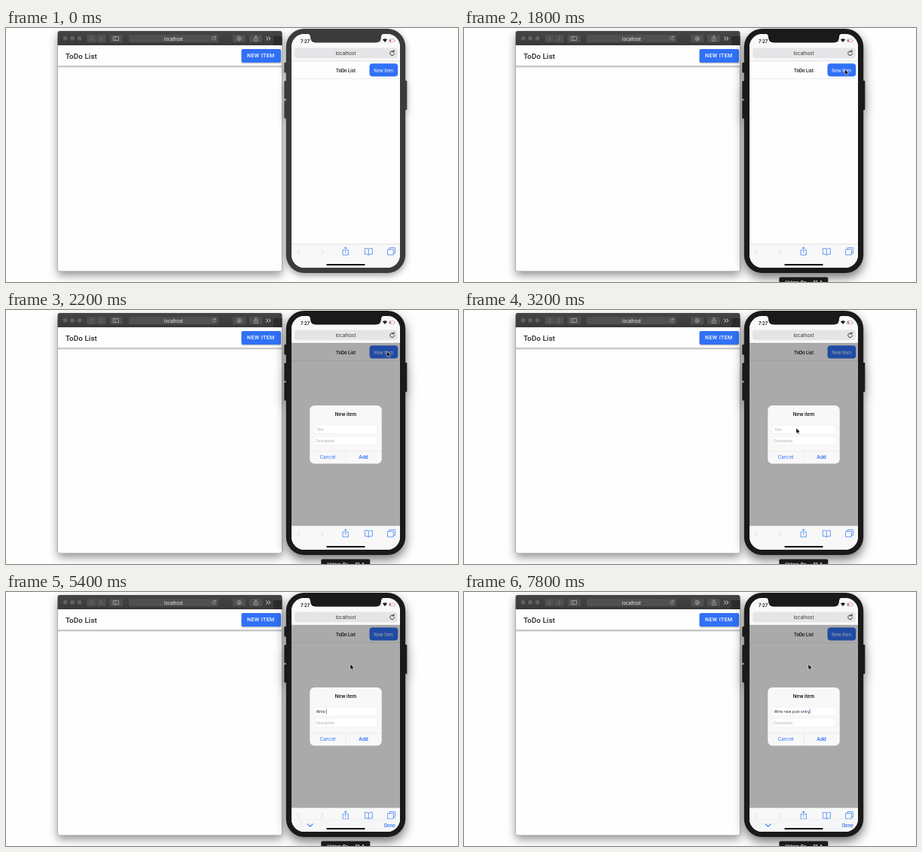
An HTML page for the animation above (8 s loop, 600 by 338 pixels).

```html
<!DOCTYPE html>
<html lang="en">
<head>
<meta charset="utf-8">
<title>ToDo List</title>
<style>
html, body { margin: 0; width: 100%; height: 100%; overflow: hidden; background: #fefefe; }
svg { display: block; width: 600px; height: 338px; }
text { font-family: Inter, "Liberation Sans", sans-serif; dominant-baseline: central; white-space: pre; }
.mid { text-anchor: middle; }
.bold { font-weight: 600; }
.roboto { font-family: Roboto, sans-serif; font-weight: 500; }
.line { fill: none; stroke-linecap: round; stroke-linejoin: round; }
#window { filter: drop-shadow(0 5px 6px rgba(0,0,0,.42)); }
#shell { fill: #3b3b3b; filter: drop-shadow(0 3px 4px rgba(0,0,0,.38)); }
.active #shell { fill: #1a1a1a; filter: drop-shadow(0 6px 7px rgba(0,0,0,.55)); }
#label { display: none; }
.active #label { display: inline; }
</style>
</head>
<body>
<svg id="stage" viewBox="0 0 600 338">
  <defs>
    <clipPath id="screen"><rect x="379" y="8" width="144" height="311" rx="17"/></clipPath>
    <linearGradient id="bar" x2="0" y2="1"><stop stop-color="#454545"/><stop offset="1" stop-color="#393939"/></linearGradient>
    <linearGradient id="fade" x2="0" y2="1"><stop stop-color="#000" stop-opacity=".34"/><stop offset="1" stop-color="#000" stop-opacity="0"/></linearGradient>
  </defs>

  <!-- desktop browser -->
  <g id="window">
    <rect x="68.6" y="4" width="297.8" height="320" rx="3" fill="#8b8b8b"/>
    <path d="M69 23H366V321.5a2 2 0 0 1-2 2H71a2 2 0 0 1-2-2Z" fill="#fefefe"/>
  </g>
  <path d="M68.6 23V7a3 3 0 0 1 3-3H363.4a3 3 0 0 1 3 3V23Z" fill="url(#bar)"/>
  <rect x="355" y="11" width="11.4" height="12" fill="#2c2c2c"/>
  <g fill="#606060"><circle cx="78.6" cy="13.7" r="2.9"/><circle cx="88" cy="13.7" r="2.9"/><circle cx="97.4" cy="13.7" r="2.9"/></g>
  <g fill="#505050">
    <rect x="107.5" y="9" width="12" height="10" rx="1.5"/><rect x="120.5" y="9" width="12" height="10" rx="1.5"/>
    <rect x="137.5" y="9" width="17.5" height="10" rx="1.5"/><rect x="163" y="9" width="119" height="10" rx="1.5"/>
    <rect x="301" y="9" width="17" height="10" rx="1.5"/><rect x="323" y="9" width="17" height="10" rx="1.5"/>
  </g>
  <g class="line" stroke="#7d7d7d" stroke-width=".8"><path d="M114.5 11.5l-2 2.5 2 2.5M125.5 11.5l2 2.5-2 2.5"/></g>
  <g class="line" stroke="#b4b4b4" stroke-width=".7">
    <path d="M142.5 11.5h7v5h-7zM145 11.5v5M278 12.4a2.3 2.3 0 1 0 .4 2M278.4 11v1.7h-1.7"/>
    <circle cx="309.5" cy="14" r="2.8"/><path d="M309.5 12.4v3M308.3 14.3l1.2 1.2 1.2-1.2"/>
    <path d="M330.3 13.3h-1v4h4.8v-4h-1M331.7 15.5v-5M330.3 11.7l1.4-1.4 1.4 1.4"/>
  </g>
  <path class="line" d="M345.5 11.8l2.1 2.2-2.1 2.2M348.7 11.8l2.1 2.2-2.1 2.2" stroke="#f2f2f2" stroke-width=".9"/>
  <text class="mid" x="222.5" y="14" font-size="5.8" fill="#eee">localhost</text>
  <rect x="69" y="50.3" width="297" height="3" fill="url(#fade)"/>
  <text class="roboto" x="79" y="37.3" font-size="9.8" letter-spacing=".1" fill="#222">ToDo List</text>
  <rect x="312.5" y="29.2" width="53" height="18.2" rx="2" fill="#000" opacity=".2"/>
  <rect x="312.5" y="28" width="52.5" height="18" rx="2" fill="#3171f6"/>
  <text class="roboto" x="320" y="37.2" font-size="7" letter-spacing=".45" fill="#fff">NEW ITEM</text>

  <!-- phone -->
  <g id="shell">
    <rect x="369.3" y="46" width="4" height="13.5" rx="1"/><rect x="369.3" y="70.5" width="4" height="24" rx="1"/>
    <rect x="369.3" y="96.5" width="4" height="24" rx="1"/><rect x="528.5" y="70" width="3.8" height="39" rx="1"/>
    <rect x="371.8" y="1" width="158.4" height="325" rx="24"/>
  </g>
  <g clip-path="url(#screen)">
    <rect x="379" y="8" width="144" height="311" fill="#fefefe"/>
    <rect x="379" y="8" width="144" height="36" fill="#f9f9f9"/>
    <rect x="379" y="43.6" width="144" height=".6" fill="#ccc"/>
    <rect x="383" y="26.5" width="137" height="13.8" rx="4" fill="#e5e5e7"/>
    <text class="mid" x="451" y="33.5" font-size="6.3" fill="#333">localhost</text>
    <path class="line" d="M514.7 31.5a2.9 2.9 0 1 0 .9 2.3M515 29.5v2.3h-2.3" stroke="#222" stroke-width=".9"/>
    <text class="bold" x="391" y="17" font-size="5.9" fill="#111">7:27</text>
    <g fill="#444"><circle cx="491.7" cy="17.8" r=".5"/><circle cx="493.5" cy="17.8" r=".5"/><circle cx="495.3" cy="17.8" r=".5"/><circle cx="497.1" cy="17.8" r=".5"/></g>
    <path d="M503 19l-3.1-3.4a4.4 4.4 0 0 1 6.2 0Z" fill="#222"/>
    <rect x="508.5" y="14.7" width="7" height="4" rx="1.1" fill="none" stroke="#999" stroke-width=".6"/>
    <rect x="509.2" y="15.4" width="1.8" height="2.6" rx=".5" fill="#ee4036"/><rect x="516" y="16" width=".7" height="1.5" fill="#999"/>
    <rect x="379" y="67" width="144" height=".6" fill="#e2e2e2"/>
    <text class="mid bold" x="451" y="56" font-size="5.75" fill="#111">ToDo List</text>
    <rect x="482.5" y="47.2" width="37.7" height="17.2" rx="4" fill="#3171f6"/>
    <text class="mid" x="501.2" y="56" font-size="5.75" fill="#fff">New Item</text>
    <rect id="shade" x="379" y="44" width="144" height="243"/>

    <rect x="379" y="287" width="144" height="32" fill="#f8f8f9"/>
    <rect x="379" y="287" width="144" height=".5" fill="#ccc"/>
    <path class="line" d="M389.5 294l-3 3.4 3 3.4M418.5 294l3 3.4-3 3.4" stroke="#d3d5d9" stroke-width=".9"/>
    <g class="line" stroke="#3f82f0" stroke-width=".8">
      <path d="M449 295.5h-2v6.5h7.4v-6.5h-2M450.7 298.8v-7M448.8 293.5l1.9-1.9 1.9 1.9"/>
      <path d="M481.3 294.2q-2.3-1.7-5-.8v7.7q2.7-.7 5 .9 2.3-1.6 5-.9v-7.7q-2.7-.9-5 .8v7.8"/>
      <path d="M507 294.6h7.3v7.3H507zM509 294.4v-2h7.4v7.4h-2"/>
    </g>
    <g id="assist">
      <rect x="379" y="302.5" width="144" height="17" fill="#f5f6f7"/>
      <rect x="379" y="302.5" width="144" height=".4" fill="#ddd"/>
      <path class="line" d="M387 312l3.3-3.2 3.3 3.2" stroke="#dcdee2" stroke-width=".9"/>
      <path class="line" d="M400.3 308.8l3.4 3.3 3.4-3.3" stroke="#3171f6" stroke-width="1.1"/>
      <text class="mid bold" x="509.3" y="310.5" font-size="5.8" fill="#3171f6">Done</text>
    </g>
    <rect x="425.3" y="314" width="51.4" height="1.9" rx=".95" fill="#0a0a0a"/>

    <g id="dialog">
      <rect x="403.3" y="127" width="95.4" height="77.4" rx="6" fill="#f8f8f8"/>
      <text class="mid bold" x="451" y="138.6" font-size="6.25" fill="#111">New item</text>
      <g fill="#fff" stroke="#e8e8e8" stroke-width=".5"><rect x="409" y="153.3" width="84" height="11.4" rx="2"/><rect x="409" y="168.3" width="84" height="11.4" rx="2"/></g>
      <text id="title" x="411.7" y="159" font-size="4.8"></text>
      <text x="411.3" y="174" font-size="4.8" letter-spacing="-.08" fill="#a8a8a8">Description</text>
      <path d="M403.3 187.8H498.7M451 187.8V204.4" stroke="#dedede" stroke-width=".5"/>
      <text class="mid" x="427" y="196" font-size="6.3" fill="#3171f6">Cancel</text>
      <text class="mid bold" x="474.6" y="196" font-size="6.4" fill="#3171f6">Add</text>
      <rect id="caret" y="155.6" width=".8" height="6.6" fill="#2f5fd0"/>
    </g>
  </g>
  <path id="notch" d="M400 7.5q4 .5 4 4.5 0 7.5 7.5 7.5h79q7.5 0 7.5-7.5 0-4 4-4.5Z"/>
  <g id="label">
    <rect x="418.3" y="331.6" width="65" height="12" rx="2" fill="#1a1a1a"/>
    <text class="mid bold" x="451" y="338.6" font-size="6" fill="#fff">Velora Qs — 12.4</text>
  </g>
  <path id="cursor" d="M0 0V7.2L1.7 5.7 2.8 8.2 4 7.7 2.9 5.2H5.1Z" fill="#000" stroke="#fff" stroke-width=".5"/>
</svg>
<script>
const $ = id => document.getElementById(id);
const LOOP = 8000, STEP = 200;
const PHRASE = "Write new post entry";

// [time, value...] tables
const path = [[1000, 530, 98], [1200, 513, 68], [1400, 505.6, 55], [2600, 505.6, 55],
  [2800, 497, 72], [3000, 468, 121], [3200, 441, 157], [3400, 441, 157], [3600, 449, 127], [3800, 457, 96]];
const typed = [[0, 0], [4400, 1], [4600, 2], [4800, 4], [5000, 5], [5400, 6], [5600, 7], [5800, 9],
  [6200, 10], [6400, 12], [6600, 14], [6800, 16], [7000, 18], [7200, 20]];
const caretOn = [[0, 0], [3400, 1], [7400, 0], [7800, 1]];

const held = (table, t) => table.filter(row => row[0] <= t).pop();
const ramp = (t, from, to) => Math.min(1, Math.max(0, (t - from) / (to - from)));
const show = (el, on) => { el.style.display = on ? "" : "none"; };

function draw(t) {
  const active = t >= 1400;
  $("stage").classList.toggle("active", active);
  $("notch").setAttribute("fill", active ? "#1a1a1a" : "#3b3b3b");

  const spot = held(path, t);
  show($("cursor"), spot);
  if (spot) $("cursor").setAttribute("transform", `translate(${spot[1]} ${spot[2]})`);

  const open = ramp(t, 1800, 2060);
  $("shade").setAttribute("opacity", .335 * open);
  const dialog = $("dialog");
  show(dialog, open > 0);
  dialog.setAttribute("opacity", .01 + .99 * open);
  dialog.setAttribute("transform", `translate(451 165.7) scale(${1.1 - .1 * open}) translate(-451 -165.7)`);

  const rise = ramp(t, 3200, 3600);
  show($("assist"), rise > 0);
  $("assist").setAttribute("transform", `translate(0 ${17 * (1 - rise)})`);

  const count = held(typed, t)[1], title = $("title");
  title.textContent = count ? PHRASE.slice(0, count) : "Title";
  title.setAttribute("fill", count ? "#222" : "#a8a8a8");
  show($("caret"), held(caretOn, t)[1]);
  $("caret").setAttribute("x", 411.5 + (count && title.getComputedTextLength()));
}

let last = -1;
const start = performance.now();
function tick() {
  const t = Math.floor((performance.now() - start) % LOOP / STEP) * STEP;
  if (t !== last) draw(last = t);
  requestAnimationFrame(tick);
}
tick();
</script>
</body>
</html>
```
